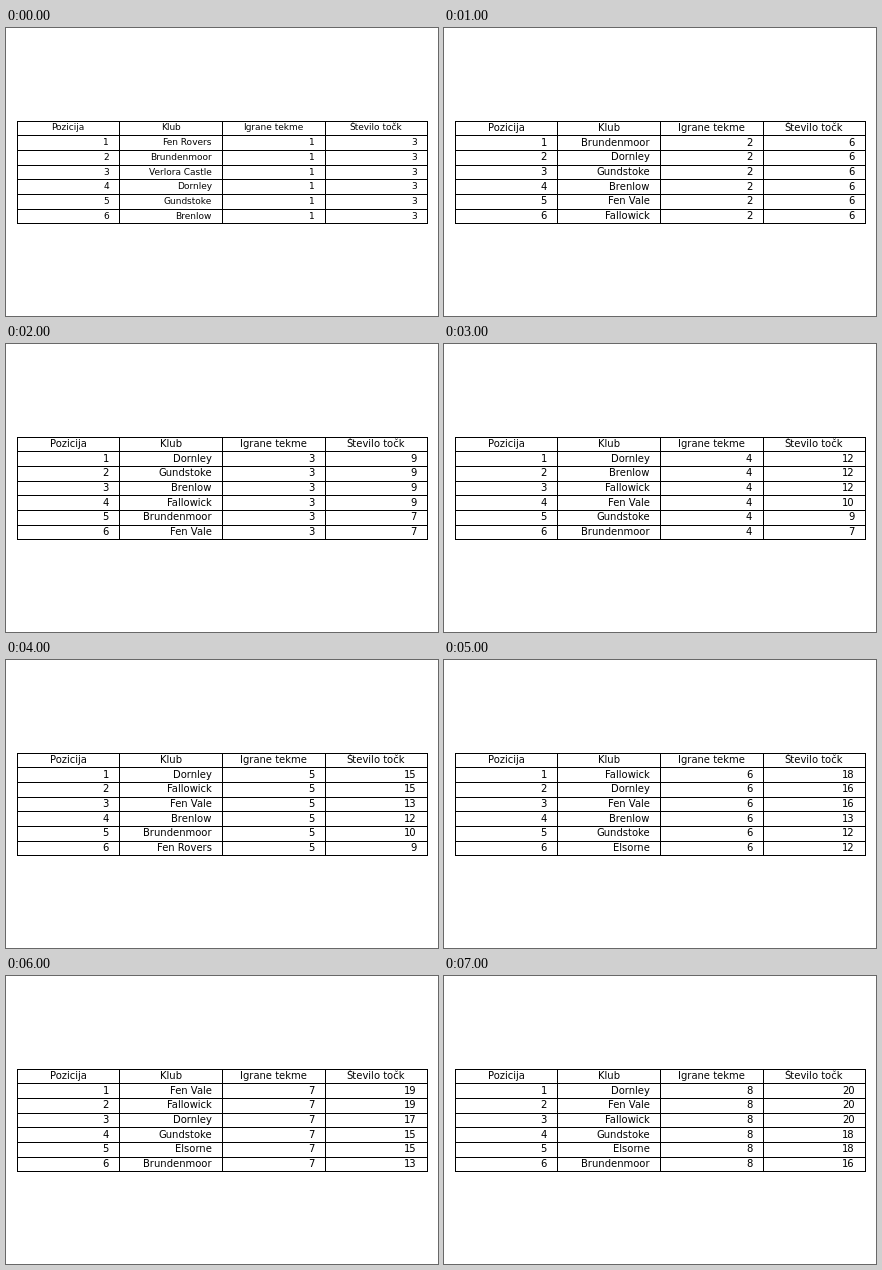
Write an HTML page that moves like this. It is 432 px wide and 288 px high and loops after 8 s.

```html
<!DOCTYPE html>
<html lang="sl">
<head>
<meta charset="utf-8">
<title>Lestvica</title>
<style>
html, body { margin: 0; width: 100%; height: 100%; overflow: hidden; background: #fff; }
svg { display: block; width: 432px; height: 288px; }
text { font-family: "DejaVu Sans", sans-serif; fill: #000; }
.grid { fill: none; stroke: #000; stroke-width: 1; shape-rendering: crispEdges; }
.round { visibility: hidden; animation: show 8s step-end infinite; }
@keyframes show {
  0% { visibility: visible; }
  12.5%, 100% { visibility: hidden; }
}
</style>
</head>
<body>
<svg viewBox="0 0 432 288"><path class="grid"/></svg>
<script>
const svg = document.querySelector("svg");
const LEFT = 10.8, COL = 102.6, TOP = 92.58, ROW = 14.7;
const HEAD = ["Pozicija", "Klub", "Igrane tekme", "Število točk"];
const CLUBS = {
  U: "Fen Rovers", B: "Brundenmoor", P: "Verlora Castle", C: "Dornley", T: "Gundstoke",
  W: "Brenlow", M: "Fen Vale", L: "Fallowick", A: "Elsorne"
};
// Club order and points after each round
const ROUNDS = [
  ["UBPCTW", [3, 3, 3, 3, 3, 3]],
  ["BCTWML", [6, 6, 6, 6, 6, 6]],
  ["CTWLBM", [9, 9, 9, 9, 7, 7]],
  ["CWLMTB", [12, 12, 12, 10, 9, 7]],
  ["CLMWBU", [15, 15, 13, 12, 10, 9]],
  ["LCMWTA", [18, 16, 16, 13, 12, 12]],
  ["MLCTAB", [19, 19, 17, 15, 15, 13]],
  ["CMLTAB", [20, 20, 20, 18, 18, 16]]
];

// Measures at a large size for exact, unhinted widths
const EM = 800;
const pen = document.createElement("canvas").getContext("2d");
pen.font = `${EM}px "DejaVu Sans", sans-serif`;
const measure = str => pen.measureText(str);
const width = (str, size) => measure(str).width * size / EM;

function add(parent, name, attrs) {
  const el = document.createElementNS("http://www.w3.org/2000/svg", name);
  for (const key in attrs) el.setAttribute(key, attrs[key]);
  return parent.appendChild(el);
}

// Snaps the left ink edge to a whole pixel; align is 0.5 for centred, 1 for right
function label(group, text, size, x, y, align) {
  const str = String(text);
  const lead = Math.round(-measure(str[0]).actualBoundingBoxLeft * size / EM * 8) / 8;
  const edge = Math.round(x - width(str, size) * align + lead);
  const xs = [edge - Math.floor(lead)];
  if (str.length > 1) {
    const step = width(str.slice(0, 2), size) - width(str[1], size);
    xs.push(edge - Math.ceil(lead) + step);
  }
  add(group, "text", { x: xs.join(" "), y }).textContent = str;
}

let grid = "";
for (let r = 0; r <= 7; r++) grid += `M11 ${Math.round(TOP + r * ROW) + 0.5}H422`;
for (let c = 0; c <= 4; c++) grid += `M${Math.round(LEFT + c * COL) + 0.5} 93V196`;
svg.querySelector(".grid").setAttribute("d", grid);

ROUNDS.forEach(([order, points], n) => {
  const size = n ? 10 : 9;
  const group = add(svg, "g", {
    class: "round",
    "font-size": size,
    style: `animation-delay:${n - 8}s`
  });
  const row = (cells, r, align, inset) => {
    const y = Math.round(TOP + (r + 0.5) * ROW + (size - 4) / 2);
    cells.forEach((text, c) => label(group, text, size, LEFT + (c + inset) * COL, y, align));
  };
  row(HEAD, 0, 0.5, 0.5);
  [...order].forEach((key, i) =>
    row([i + 1, CLUBS[key], n + 1, points[i]], i + 1, 1, 0.9));
});
</script>
</body>
</html>
```
